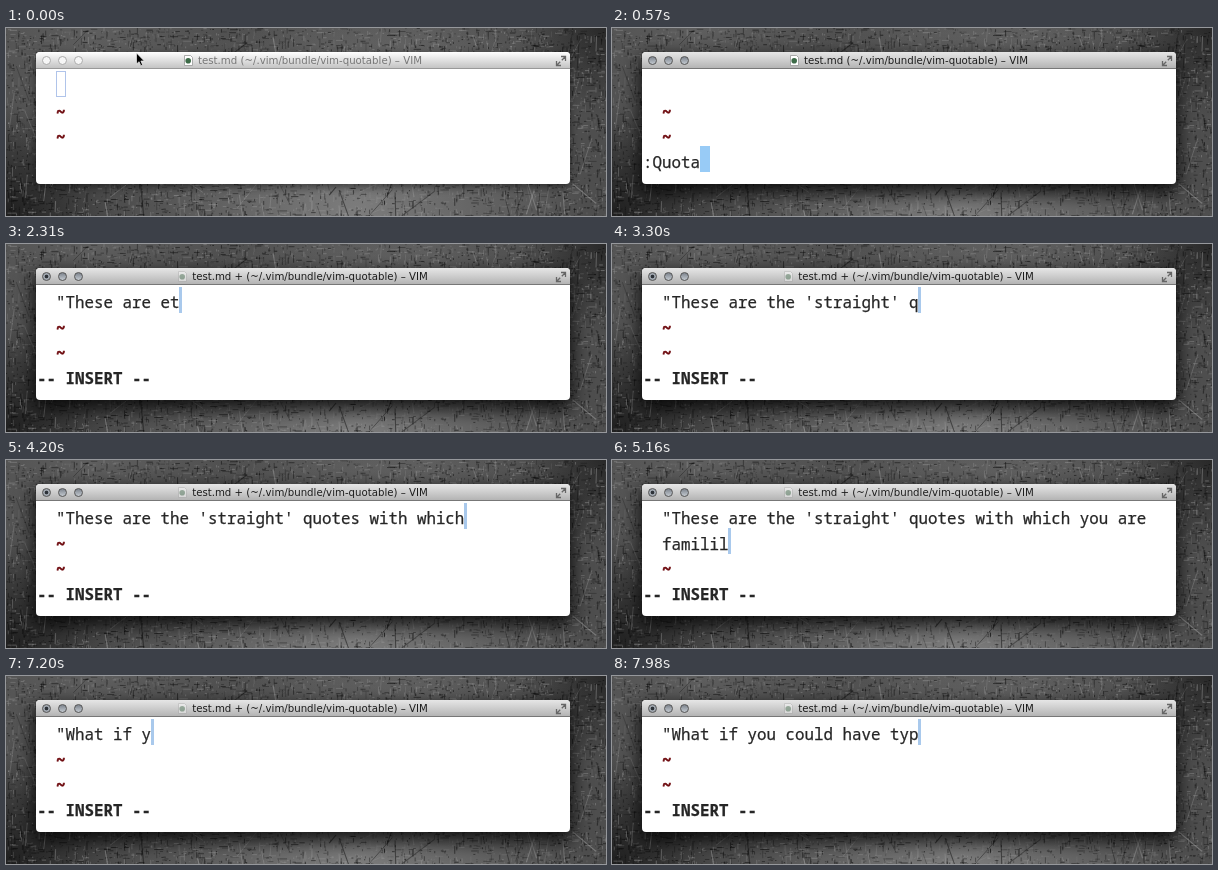
These frames come from a looping animation (600x188 px, 8 s). An HTML page with a canvas:

```html
<!DOCTYPE html>
<html lang="en">
<head>
<meta charset="utf-8">
<title>Quotable demo</title>
<style>
  html, body { margin: 0; width: 100%; height: 100%; overflow: hidden; background: #333; }
  #stage { position: relative; width: 600px; height: 188px; overflow: hidden; }
  #stage div, #wall, #pointer { position: absolute; }
  #wall { left: 0; top: 0; }
  #window {
    left: 29.5px; top: 24px; width: 534px; height: 131.5px; border-radius: 4px;
    background: #fff; box-shadow: 0 7px 18px 3px rgba(0, 0, 0, .8); overflow: hidden;
  }
  #window.idle { box-shadow: 0 3px 8px rgba(0, 0, 0, .5); }
  #bar {
    left: 0; top: 0; width: 534px; height: 17px;
    background: linear-gradient(#e6e6e6, #d0d0d0 45%, #b4b4b4);
    border-bottom: 1px solid #777; box-sizing: border-box;
  }
  #title {
    left: 0; top: 0; width: 534px; height: 17px; display: flex;
    align-items: center; justify-content: center;
    font: 10.2px/17px "DejaVu Sans", sans-serif; color: #1c1c1c; white-space: pre;
  }
  #title svg { width: 11px; height: 11px; margin-right: 4px; }
  .button {
    top: 4px; width: 9px; height: 9px; border-radius: 50%; box-sizing: border-box;
    border: 1px solid #555; background: linear-gradient(#7d848d, #c3c9d0);
  }
  .dirty .button:first-child { background: radial-gradient(circle, #2d3238 1.4px, #a0a7af 2.2px); }
  .dirty #title svg { opacity: .4; }
  .idle .button { background: #f6f6f6; border-color: #aaa; }
  .idle #bar { background: linear-gradient(#fff, #e4e4e4 45%, #c4c4c4); border-color: #999; }
  .idle #title { color: #777; }
  #arrows { position: absolute; left: 519px; top: 3px; }
  .row {
    left: 50px; height: 25.3px; white-space: pre; color: #262626;
    font: 15.83px/25.3px "Noto Sans Mono", "DejaVu Sans Mono", monospace;
    -webkit-text-stroke: .25px;
  }
  .row.tilde { color: #6e0a0e; font-weight: bold; -webkit-text-stroke: .7px; }
  .row.bold { font-weight: bold; }
  #cursor { height: 26px; background: #98cbf6; box-sizing: border-box; }
  #cursor.bar { background: #a9c9ec; }
  #cursor.hollow { background: none; border: 1px solid #b0c4ea; }
  #pointer { left: 129px; top: 24px; }
</style>
</head>
<body>
<div id="stage">
  <canvas id="wall" width="600" height="188"></canvas>
  <div id="window">
    <div id="bar">
      <div class="button" style="left:6.500px"></div>
      <div class="button" style="left:22.500px"></div>
      <div class="button" style="left:38.500px"></div>
      <div id="title">
        <svg viewBox="0 0 11 11"><path d="M1.5 .5h6l2 2v8h-8z" fill="#fff" stroke="#999" stroke-width=".8"/><circle cx="5.2" cy="5.8" r="2.8" fill="#3d6b48"/></svg><span id="name"></span>
      </div>
      <svg id="arrows" width="12" height="12" fill="none" stroke="#666" stroke-width="1.3"><path d="M6 1.5h4.500v4.500M10 2L6.800 5.200M1.500 6v4.500H6M2 10l3.200-3.200"/></svg>
    </div>
  </div>
  <div id="cursor"></div>
  <div class="row" id="row0"></div>
  <div class="row" id="row1"></div>
  <div class="row" id="row2"></div>
  <div class="row" id="row3" style="left:31px"></div>
  <svg id="pointer" width="10" height="16"><path d="M1.500 1v11l2.600-2.300 1.700 4 1.800-.8-1.700-3.900h3.400z" fill="#000" stroke="#eee" stroke-width=".7"/></svg>
</div>
<script>
const LOOP = 8000, COL = 9.5, ROW = 25.3, LEFT = 50, COLS = 54;
const FOCUS = 270, COMMAND = 420, RUN = 1000, INSERT = 1320, ESCAPE = 6000, CLEAR = 6300, AGAIN = 6660;
const $ = id => document.getElementById(id);

// Each burst spreads its keys evenly; "<" is a backspace.
const command = [[COMMAND, 920, ':QuotableEducateOff']];
const first = [
  [1400, 2290, '"These are et'],
  [2330, 4180, "<<the 'straight' quotes with which"],
  [4210, 5150, ' you are familil'],
  [5190, 5600, '<ar."']
];
const second = [[6740, 7970, '"What if you could have typ']];

function typed(bursts, t) {
  let text = '';
  for (const [start, end, keys] of bursts) {
    const count = t < start ? 0 : 1 + Math.floor((t - start) / (end - start) * (keys.length - 1) + 1e-6);
    for (const key of keys.slice(0, count)) text = key === '<' ? text.slice(0, -1) : text + key;
  }
  return text;
}

function wrap(text) {
  if (text.length <= COLS) return [text];
  const cut = text.lastIndexOf(' ', COLS) + 1;
  return [text.slice(0, cut), text.slice(cut)];
}

function setRow(index, text, style = '') {
  const row = $('row' + index);
  row.textContent = text;
  row.className = 'row ' + style;
  row.style.top = 46.4 + index * ROW + 'px';
}

function placeCursor(x, row, style = '') {
  const cursor = $('cursor');
  cursor.className = style;
  cursor.style.left = x + 'px';
  cursor.style.top = 42.5 + row * ROW + 'px';
  cursor.style.width = style === 'bar' ? '3px' : '10px';
}

function render(t) {
  const inserting = (t >= INSERT && t < ESCAPE) || t >= AGAIN;
  const dirty = t >= first[0][0];
  const lines = wrap(t < CLEAR ? typed(first, t) : typed(second, t));
  const prompt = typed(command, t);

  $('window').className = t < FOCUS ? 'idle' : dirty ? 'dirty' : '';
  $('name').textContent = `test.md ${dirty ? '+ ' : ''}(~/.vim/bundle/vim-quotable) – VIM`;
  $('pointer').style.display = t < COMMAND ? '' : 'none';

  for (let i = 0; i < 3; i++) {
    if (i < lines.length) setRow(i, lines[i]);
    else setRow(i, '~', 'tilde');
  }

  if (inserting) setRow(3, '-- INSERT --', 'bold');
  else if (t < INSERT) setRow(3, prompt);
  else setRow(3, t < CLEAR ? '' : '--No lines in buffer--');

  const last = lines.length - 1, end = lines[last].length;
  if (t >= COMMAND && t < RUN) placeCursor(31 + prompt.length * COL, 3);
  else if (inserting) placeCursor(LEFT + end * COL - .5, last, 'bar');
  else placeCursor(LEFT + Math.max(0, end - 1) * COL, last, t < FOCUS ? 'hollow' : '');
}

function paintWall() {
  const c = $('wall').getContext('2d');
  let seed = 11;
  const random = () => (seed = (seed * 16807) % 2147483647) / 2147483647;
  const shade = (v, a) => `rgba(${v},${v},${v},${a})`;

  c.fillStyle = '#4e4e4e';
  c.fillRect(0, 0, 600, 188);
  const glow = (x, y, r, v, a) => {
    const g = c.createRadialGradient(x, y, 0, x, y, r);
    g.addColorStop(0, shade(v, a));
    g.addColorStop(1, shade(v, 0));
    c.fillStyle = g;
    c.fillRect(0, 0, 600, 188);
  };
  glow(90, 0, 150, 110, .5);
  glow(420, 0, 170, 105, .4);
  glow(350, 188, 230, 145, .7);
  glow(0, 188, 110, 10, .7);
  glow(600, 0, 90, 15, .6);

  // Fine horizontal and vertical brush marks.
  for (let i = 0; i < 9000; i++) {
    const across = random() < .5, length = 1 + random() * random() * 9;
    c.fillStyle = shade(random() < .58 ? 8 : 150, .15 + random() * .4);
    c.fillRect(random() * 600, random() * 188, across ? length : 1, across ? 1 : length);
  }
  for (let i = 0; i < 130; i++) {
    const x = random() * 600, y = random() * 188, len = 8 + random() * 35;
    const angle = random() < .6 ? 1.2 + random() * .7 : random() * 3;
    c.strokeStyle = shade(random() < .5 ? 8 : 160, .25 + random() * .4);
    c.lineWidth = .5 + random() * .7;
    c.beginPath();
    c.moveTo(x, y);
    c.lineTo(x + Math.cos(angle) * len, y + Math.sin(angle) * len);
    c.stroke();
  }
}

const begin = performance.now();
function tick() {
  render((performance.now() - begin) % LOOP);
  requestAnimationFrame(tick);
}
paintWall();
render(0);
requestAnimationFrame(tick);
</script>
</body>
</html>
```
